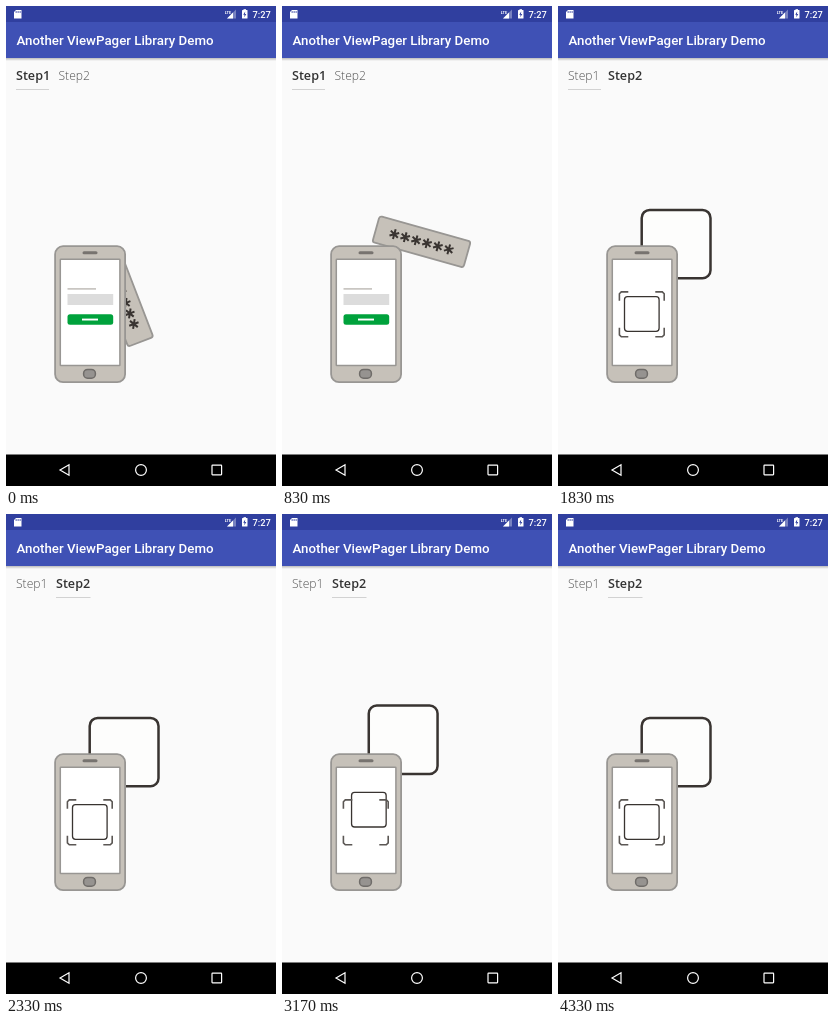
An HTML page with a canvas for the animation above (4.49 s loop, 270 by 480 pixels).

```html
<!DOCTYPE html>
<html lang="en">
<head>
<meta charset="utf-8">
<title>Pager demo</title>
<style>
  html, body { margin: 0; width: 100%; height: 100%; overflow: hidden; background: #fafafa; }
  canvas { display: block; width: 270px; height: 480px; }
</style>
</head>
<body>
<canvas id="stage"></canvas>
<script>
const LOOP = 4490, STEP = 500 / 3;
const DARK = '#393431', BODY = '#c6c1b9', EDGE = '#989693';
const canvas = document.getElementById('stage');
const ctx = canvas.getContext('2d');
const dpr = window.devicePixelRatio || 1;
canvas.width = 270 * dpr;
canvas.height = 480 * dpr;

const mix = (a, b, p) => a + (b - a) * p;
const span = (t, from, to) => Math.min(1, Math.max(0, (t - from) / (to - from)));
const ease = p => (1 - Math.cos(Math.PI * p)) / 2;

function rect(x, y, w, h, color) {
  ctx.fillStyle = color;
  ctx.fillRect(x, y, w, h);
}

function paint(fill, stroke, width) {
  if (fill) { ctx.fillStyle = fill; ctx.fill(); }
  if (stroke) { ctx.strokeStyle = stroke; ctx.lineWidth = width; ctx.stroke(); }
}

function box(x, y, w, h, r, fill, stroke, width) {
  ctx.beginPath();
  ctx.roundRect(x, y, w, h, r);
  paint(fill, stroke, width);
}

function poly(points, fill, stroke, width, close = true) {
  ctx.beginPath();
  points.forEach(([x, y]) => ctx.lineTo(x, y));
  if (close) ctx.closePath();
  paint(fill, stroke, width);
}

function text(str, x, y, font, color) {
  ctx.font = font;
  ctx.fillStyle = color;
  ctx.fillText(str, x, y);
}

function drawBars() {
  rect(0, 0, 270, 480, '#fafafa');
  const shade = ctx.createLinearGradient(0, 52, 0, 55);
  shade.addColorStop(0, 'rgba(0,0,0,.25)');
  shade.addColorStop(1, 'rgba(0,0,0,0)');
  rect(0, 52, 270, 3, shade);
  rect(0, 0, 270, 16, '#303f9f');
  rect(0, 16, 270, 36, '#3f51b5');
  text('Another ViewPager Library Demo', 10.5, 39, '500 13.3px Roboto, sans-serif', '#fff');

  // status icons
  poly([[10, 4], [15.5, 4], [15.5, 12.5], [8, 12.5], [8, 6]], '#fff');
  for (const x of [10, 12, 14]) rect(x - 0.3, 5, 0.8, 2, '#303f9f');
  text('LTE', 218.8, 7.8, '700 4px Roboto, sans-serif', '#fff');
  poly([[230, 3.5], [230, 12.5], [221, 12.5]], 'rgba(255,255,255,.35)');
  poly([[227, 6.5], [227, 12.5], [221, 12.5]], '#fff');
  rect(237.5, 3.2, 2.5, 1.5, '#fff');
  box(236, 4, 5.5, 8.5, 0.6, '#fff');
  poly([[239.2, 5.5], [237.2, 8.8], [238.5, 8.8], [238.3, 11.2], [240.3, 7.9], [239, 7.9]], '#303f9f');
  text('7:27', 246.5, 11.5, '500 9.3px Roboto, sans-serif', '#fff');

  // navigation bar
  rect(0, 448.5, 270, 31.5, '#000');
  poly([[54, 464], [63, 458.7], [63, 469.3]], null, '#fff', 1.2);
  ctx.beginPath();
  ctx.arc(135, 464, 5.4, 0, 7);
  paint(null, '#fff', 1.2);
  box(206, 459.2, 9.6, 9.6, 0.5, null, '#fff', 1.2);
}

function drawTabs(t) {
  const second = t > 1490;
  const label = (str, x, active) => text(str, x, 74,
    (active ? '600 12.6px' : '300 12.1px') + ' "Open Sans", sans-serif',
    active ? '#333' : '#555');
  label('Step1', 10, !second);
  label('Step2', second ? 50 : 52.5, second);
  const p = ease(span(t, 1840, 2200));
  rect(mix(10, 50, p), 83, mix(33, 34.5, p), 1, '#d2d2d2');
}

function drawAsterisk(x) {
  ctx.beginPath();
  for (let i = 0; i < 3; i++) {
    const a = Math.PI / 2 + i * Math.PI / 3;
    const dx = 5 * Math.cos(a), dy = 5 * Math.sin(a);
    ctx.moveTo(x - dx, -dy);
    ctx.lineTo(x + dx, dy);
  }
  paint(null, DARK, 2);
}

// The password card swings about a point hidden behind the phone.
function drawPassword(t) {
  const out = ease(span(t, -250, 450)) * (1 - ease(span(t, 1180, 1560)));
  if (out <= 0) return;
  ctx.save();
  ctx.translate(73, 242);
  ctx.rotate(mix(90, 15.6, out) * Math.PI / 180);
  ctx.translate(62.4, -23.9);
  box(-47.3, -13.5, 94.6, 27, 2.5, BODY, EDGE, 1.8);
  for (let i = 0; i < 6; i++) drawAsterisk((i - 2.5) * 11.3);
  ctx.restore();
}

// Scan path: time, x, y
const PATH = [[2350, 0, 0], [2560, -9, 0], [2820, -9, -12.3],
  [3280, 7, -12.3], [3490, 7, 0], [3660, 0, 0]];

function scanOffset(t) {
  let pos = [0, 0];
  for (let i = 1; i < PATH.length; i++) {
    const [t0, x0, y0] = PATH[i - 1], [t1, x1, y1] = PATH[i];
    const p = span(t, t0, t1);
    if (p > 0) pos = [mix(x0, x1, p), mix(y0, y1, p)];
  }
  return pos;
}

function drawBackCard(t, [dx, dy]) {
  const p = ease(span(t, 1400, 1800));
  if (p <= 0) return;
  ctx.save();
  ctx.translate(mix(84, 118.1, p) + dx, mix(300, 238.1, p) + dy);
  ctx.scale(mix(0.8, 1, p), mix(0.8, 1, p));
  box(-34.4, -34.2, 68.8, 68.4, 8, '#fdfdfc', DARK, 2.5);
  ctx.restore();
}

function drawForm() {
  rect(61.5, 282.2, 28.5, 1.4, '#bcb8b4');
  rect(61.5, 288, 45.7, 11, '#dcdcdc');
  box(61.5, 308.3, 45.7, 10.4, 2.5, '#00a23c');
  rect(76, 312.6, 16, 1.9, '#fff');
}

function drawScanner([dx, dy]) {
  box(66.5 + dx, 290.7 + dy, 34.6, 34.6, 3, null, DARK, 1.3);
  for (const sx of [-1, 1]) for (const sy of [-1, 1]) {
    const at = (x, y) => [83.8 + sx * x, 308.3 + sy * y];
    poly([at(13.5, 22.4), at(20.5, 22.4), at(22.4, 20.5), at(22.4, 13.5)],
      null, '#5b5754', 1.6, false);
  }
}

function drawPhone(t, offset) {
  box(49.1, 240.2, 70, 136, 8, BODY, EDGE, 1.8);
  box(76.5, 245.2, 15, 3, 1.5, '#77736f');
  box(77.6, 363.4, 11.8, 8.8, 4, '#969390', '#6f6c69', 1.5);
  box(54.3, 253.2, 59.6, 106.4, 0.5, '#fff', EDGE, 1.5);
  const p = span(t, 1350, 1750);
  ctx.globalAlpha = 1 - p;
  drawForm();
  ctx.globalAlpha = p;
  drawScanner(offset);
  ctx.globalAlpha = 1;
}

function draw(t) {
  ctx.setTransform(dpr, 0, 0, dpr, 0, 0);
  const offset = scanOffset(t);
  drawBars();
  drawTabs(t);
  drawPassword(t);
  drawBackCard(t, offset);
  drawPhone(t, offset);
}

const start = performance.now();
function tick() {
  const t = (performance.now() - start) % LOOP;
  draw(Math.floor((t + 4) / STEP) * STEP);
  requestAnimationFrame(tick);
}
tick();
</script>
</body>
</html>
```
